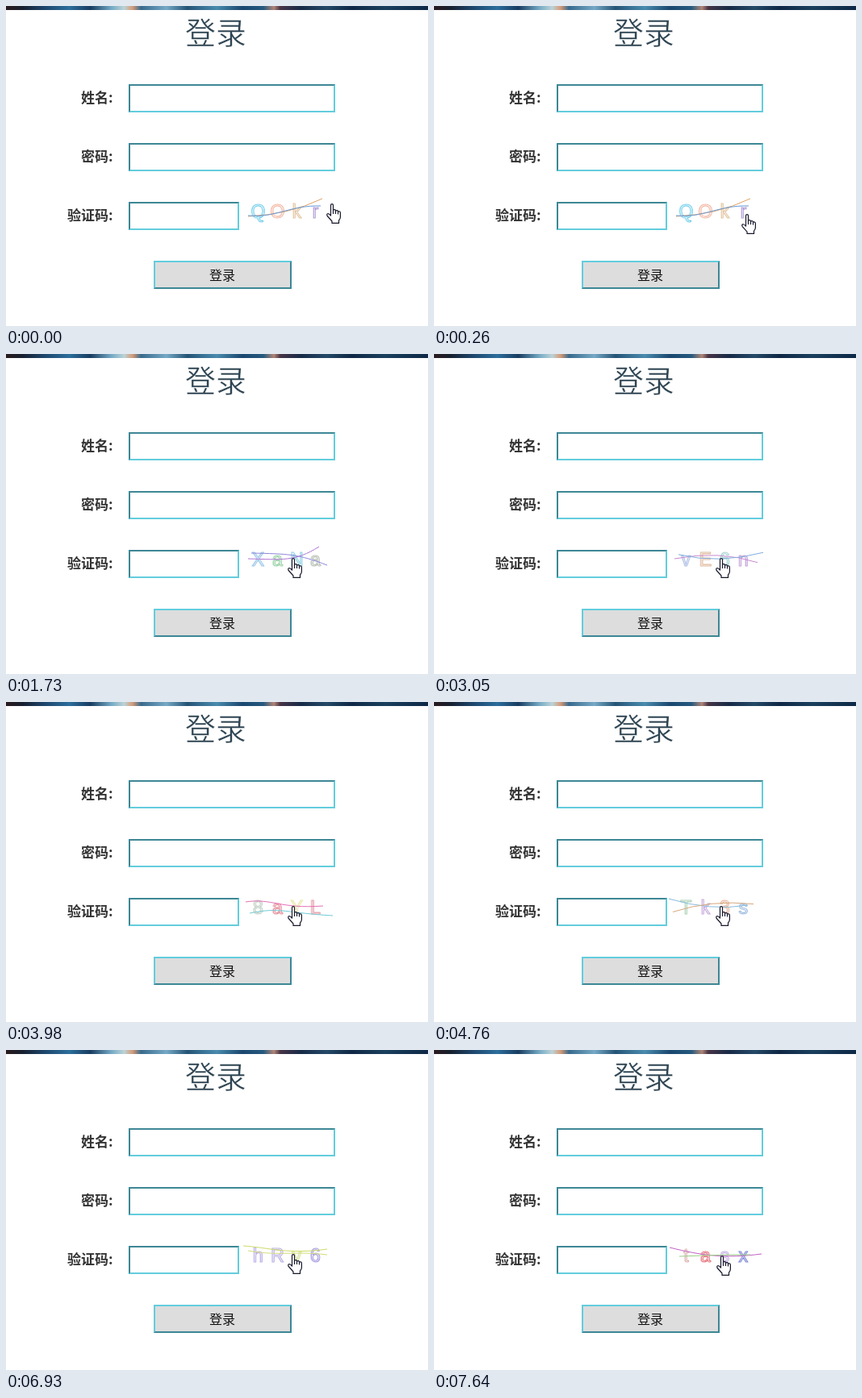
Write an HTML page that moves like this. It is 523 px wide and 397 px high and loops after 8 s.

```html
<!DOCTYPE html>
<html lang="zh-CN">
<head>
<meta charset="utf-8">
<title>登录</title>
<style>
html, body { margin: 0; width: 100%; height: 100%; overflow: hidden; background: #fff; }
body { position: relative; font-family: "Noto Sans CJK SC", "Noto Sans CJK", sans-serif; }
.banner {
  position: absolute; inset: 0 0 auto; height: 5px;
  background:
    linear-gradient(170deg, #0000 45%, #0a1b3a99),
    linear-gradient(90deg, #2a1a1d, #17202f 4%, #1d456b 9%, #2c6e9c 15%, #183c60 20%,
      #75aac5 25%, #bcd3d8 28%, #d59a75 30%, #386a8d 32%, #75a9c5 38%, #245375 43%,
      #4d91b4 50%, #1c4d75 56%, #2b668c 61%, #d99e83 63.5%, #573b49 65%, #1b304c 70%,
      #315f7e 76%, #122f4c 82%, #28607e 90%, #123a58);
}
.box { position: absolute; box-sizing: border-box; height: 35px; border: 2px solid; border-color: #3d8795 #63cddd #63cddd #3d8795; }
.button { left: 183px; top: 316px; width: 171px; background: #ddd; border-color: #63cddd #3d8795 #3d8795 #63cddd; }
svg { position: absolute; left: 0; top: 0; }
.title { font-size: 38px; font-weight: 300; fill: #2f4553; stroke: #fff; stroke-width: .5px; }
.label { font-size: 17px; font-weight: 700; fill: #333; }
.submit { font-size: 16px; fill: #111; }
.glyph { font: 23px "Liberation Sans", Arial, sans-serif; text-anchor: middle; }
</style>
</head>
<body>
<div class="banner"></div>
<div class="box" style="left:152px;top:97px;width:256px"></div>
<div class="box" style="left:152px;top:170px;width:256px"></div>
<div class="box" style="left:152px;top:243px;width:137px"></div>
<div class="box button"></div>
<svg width="523" height="397" viewBox="0 0 523 397">
  <text class="title" x="222" y="47">登录</text>
  <text class="label" x="93" y="120">姓名:</text>
  <text class="label" x="93" y="193">密码:</text>
  <text class="label" x="76" y="266">验证码:</text>
  <text class="submit" x="252" y="340">登录</text>
  <g id="codes"></g>
  <g id="hand" fill="#fff" stroke="#17182b" stroke-width="1.2" stroke-linejoin="round" stroke-linecap="round">
    <path d="M5.5 15V2.3Q5.5.6 7 .6T8.5 2.3V8Q11.3 6.8 11.5 9Q14.2 7.8 14.5 10Q17.4 9.2 17.4 12V17Q17.4 19 15.5 21V24.4H7V22L1.2 15.5Q.1 13.4 1.6 12.8T5.5 15Z"/>
    <path d="M8.5 8v4.5M11.5 9v3.5M14.5 10v3" fill="none"/>
  </g>
</svg>
<script>
const LOOP = 8000;
const SLOTS = [312, 336, 360, 383];
const SVG_NS = "http://www.w3.org/2000/svg";

// Two gentle curves spanning left..right, shaped by a seed.
const waves = (left, right, seed) => [0, 1].map(i => {
  const y = k => 252 + 9 * Math.sin(seed * 2.3 + k * 2.1 + i * 3);
  return `M${left + i * 5} ${y(0)}Q${(left + right) / 2} ${y(1)} ${right - (1 - i) * 7} ${y(2)}`;
});

// Start time, letters, letter colours, curves, curve colours.
const codes = [
  [0, "QOkr", ["#54c4e6", "#f0a58c", "#dcb98c", "#a28bd0"],
    ["M300 261Q350 259 392 239", "M300 260C335 263 352 247 390 248"], ["#dfa164", "#6799d9"]],
  [1030, "hK4e", ["#88b6d8", "#8fcf9b", "#b79bd8", "#dc9aa8"], waves(301, 408, 1), ["#75b7d6", "#b188cd"]],
  [1730, "XaNa", ["#85b9e4", "#80c690", "#78c7de", "#a5b1a2"],
    ["M300 254C342 255 358 258 388 239", "M304 247C350 248 362 248 398 262"], ["#b074d5", "#8e86dc"]],
  [2350, "RcYm", ["#d99ca8", "#91a9df", "#88c8a0", "#c2a176"], waves(294, 399, 2), ["#75bd91", "#d790b4"]],
  [3050, "vE6n", ["#9aaee0", "#d8a884", "#90c8c5", "#b58dd1"], waves(298, 408, 4), ["#c88acf", "#7faede"]],
  [3980, "8aYL", ["#b2c4b6", "#df7585", "#e4e196", "#df8290"],
    ["M297 248C330 243 338 257 393 253", "M302 262C340 254 348 262 405 265"], ["#e56fb4", "#70cad5"]],
  [4760, "Tk3s", ["#98c8a4", "#bc9bd5", "#dfa087", "#86acd8"], waves(291, 396, 5), ["#87bddc", "#d5a87c"]],
  [5540, "YedO", ["#b6dfbc", "#b0c3ad", "#b99ae0", "#a481df"],
    ["M296 259C330 242 336 243 396 251", "M300 255C330 264 350 259 394 254"], ["#72d477", "#dc91dd"]],
  [6320, "nX2p", ["#d7a1bb", "#8bb8d9", "#a8cc8f", "#9e94d8"], waves(297, 406, 7), ["#d6a470", "#8eafe0"]],
  [6930, "hRv6", ["#aa99e2", "#a99cdd", "#cbd982", "#9181d8"],
    ["M294 243C325 245 350 254 398 247", "M300 249C340 256 355 249 398 254"], ["#cddb65", "#d4dd7b"]],
  [7640, "tasx", ["#d3a49c", "#df545f", "#b6a0df", "#6570d0"],
    ["M292 245C332 255 360 259 406 253", "M304 256C335 255 350 254 392 254"], ["#c35fc7", "#98cf83"]],
];

function add(parent, tag, attrs, text = "") {
  const node = document.createElementNS(SVG_NS, tag);
  for (const [name, value] of Object.entries(attrs)) node.setAttribute(name, value);
  node.textContent = text;
  return parent.appendChild(node);
}

const layers = codes.map(([, letters, inks, curves, lineInks]) => {
  const group = add(document.getElementById("codes"), "g", {});
  [...letters].forEach((letter, i) => {
    const outline = { class: "glyph", x: SLOTS[i], y: 263, fill: "none", stroke: inks[i] };
    add(group, "text", { ...outline, "stroke-width": 1.5, opacity: .3 }, letter);
    add(group, "text", { ...outline, x: SLOTS[i] + .6, "stroke-width": .65 }, letter);
  });
  curves.forEach((d, i) => add(group, "path", { d, fill: "none", stroke: lineInks[i] }));
  return group;
});

const hand = document.getElementById("hand");

function handPosition(time) {
  if (time >= 7160) return [350, 255];
  const step = time < 70 ? 0 : Math.min(9, 1 + Math.floor((time - 70) / 72.5));
  const p = step / 9;
  return [397 - 48 * p, 245 + 8 * p + 12 * Math.sin(Math.PI * p)];
}

const start = performance.now();
function draw(now) {
  const time = Math.max(0, now - start) % LOOP;
  const current = codes.findLastIndex(([from]) => time >= from);
  layers.forEach((layer, i) => layer.setAttribute("display", i === current ? "inline" : "none"));
  hand.setAttribute("transform", `translate(${handPosition(time)})`);
  requestAnimationFrame(draw);
}
draw(start);
</script>
</body>
</html>
```
